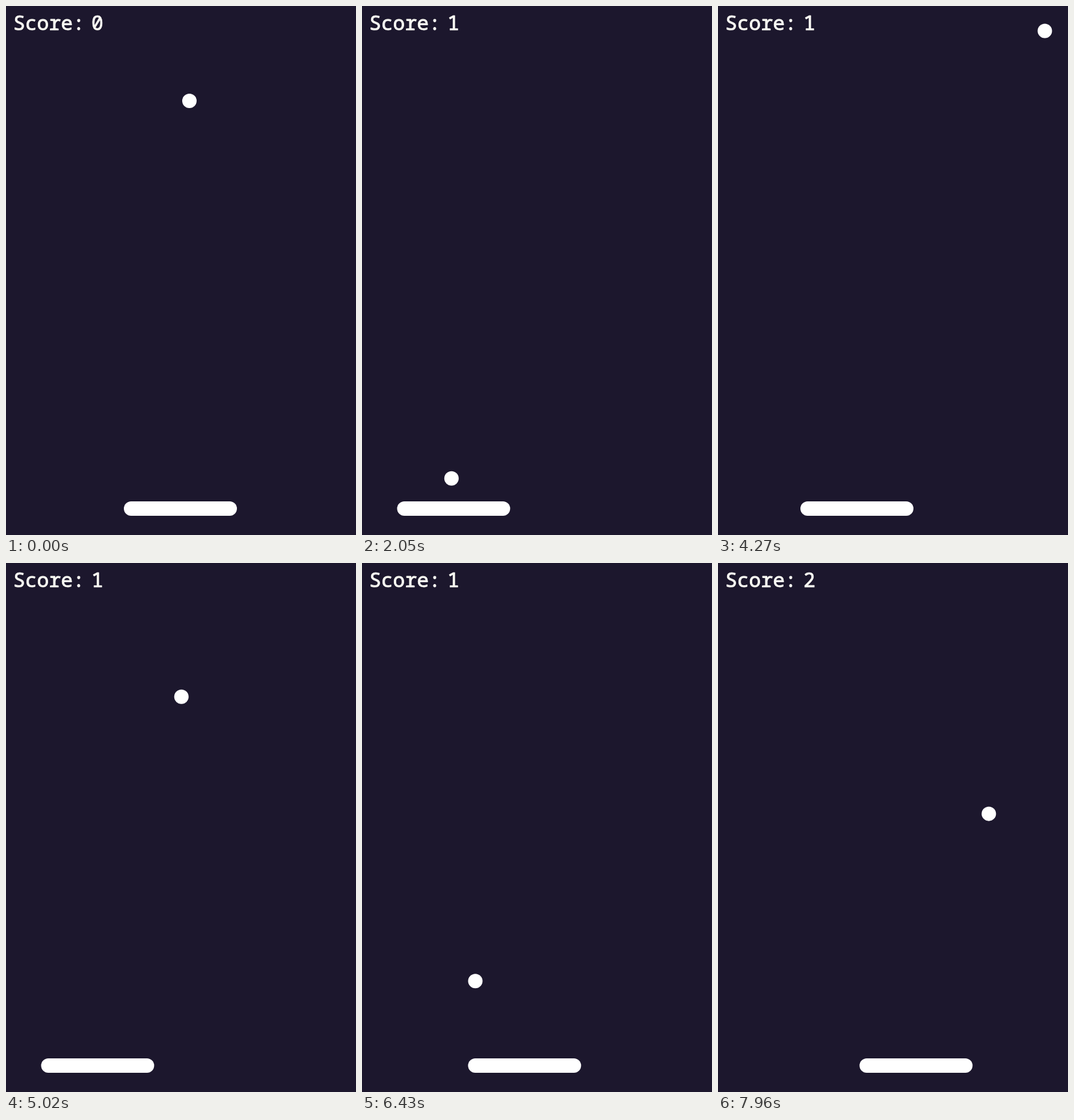
An HTML page with a canvas for the animation above (7990 ms loop, 582 px wide and 881 px high).

```html
<!DOCTYPE html>
<html lang="en">
<head>
<meta charset="utf-8">
<title>Paddle ball</title>
<style>
  html, body { margin: 0; width: 100%; height: 100%; overflow: hidden; background: #1c172d; }
  canvas { display: block; }
</style>
</head>
<body>
<canvas id="stage" width="582" height="881"></canvas>
<script>
const ctx = document.getElementById('stage').getContext('2d');
const LOOP = 7990, TICK = 30, SYNC = 820;
const RADIUS = 12, PADDLE_W = 188, PADDLE_Y = 825;
const SPEED = 0.3357, PADDLE_STEP = 9.83;

// The ball keeps one speed on both axes and reverses at each turn.
const BALL = {
  x: { start: 305, turns: [571, 5.25, 575.2, 3.4, 576.2] },
  y: { start: 158, turns: [816.5, 6.3, 813.7] }
};

// Key presses: the paddle takes one step per tick while a key is held.
const MOVES = [
  { at: 1420, steps: -14 }, { at: 2500, steps: 8 }, { at: 4510, steps: -8 },
  { at: 5110, steps: 8 }, { at: 6310, steps: 10 }
];

// Position after travelling a distance, and how many turns were passed.
function bounce({ start, turns }, distance) {
  let pos = start, dir = 1, passed = 0;
  for (const turn of turns) {
    const leg = Math.abs(turn - pos);
    if (distance < leg) break;
    distance -= leg;
    pos = turn;
    dir = -dir;
    passed++;
  }
  return { pos: pos + dir * distance, passed };
}

function paddleLeft(t) {
  return MOVES.reduce((x, { at, steps }) => {
    const taken = Math.min(Math.abs(steps), Math.max(0, (t - at) / TICK));
    return x + Math.sign(steps) * taken * PADDLE_STEP;
  }, 196);
}

function snap(t) {
  const base = t < SYNC ? 0 : SYNC;
  return base + Math.floor((t - base) / TICK) * TICK;
}

function label(text, x, align) {
  ctx.textAlign = align;
  ctx.fillText(text, x, 39.5);
  ctx.strokeText(text, x, 39.5);
}

function draw(t) {
  const x = bounce(BALL.x, SPEED * t);
  const y = bounce(BALL.y, SPEED * t);

  ctx.fillStyle = '#1c172d';
  ctx.fillRect(0, 0, 582, 881);

  ctx.fillStyle = ctx.strokeStyle = '#f8f8f2';
  ctx.font = '33px "Noto Sans Mono", monospace';
  ctx.lineWidth = 1;
  ctx.lineJoin = 'round';
  label('Score:', 12, 'left');
  label(Math.ceil(y.passed / 2), 152, 'center');

  ctx.fillStyle = '#fff';
  ctx.beginPath();
  ctx.roundRect(paddleLeft(t), PADDLE_Y, PADDLE_W, 2 * RADIUS, RADIUS);
  ctx.fill();
  ctx.beginPath();
  ctx.arc(x.pos, y.pos, RADIUS, 0, 2 * Math.PI);
  ctx.fill();
}

const start = performance.now();
function tick() {
  draw(snap((performance.now() - start) % LOOP));
  requestAnimationFrame(tick);
}
tick();
</script>
</body>
</html>
```
